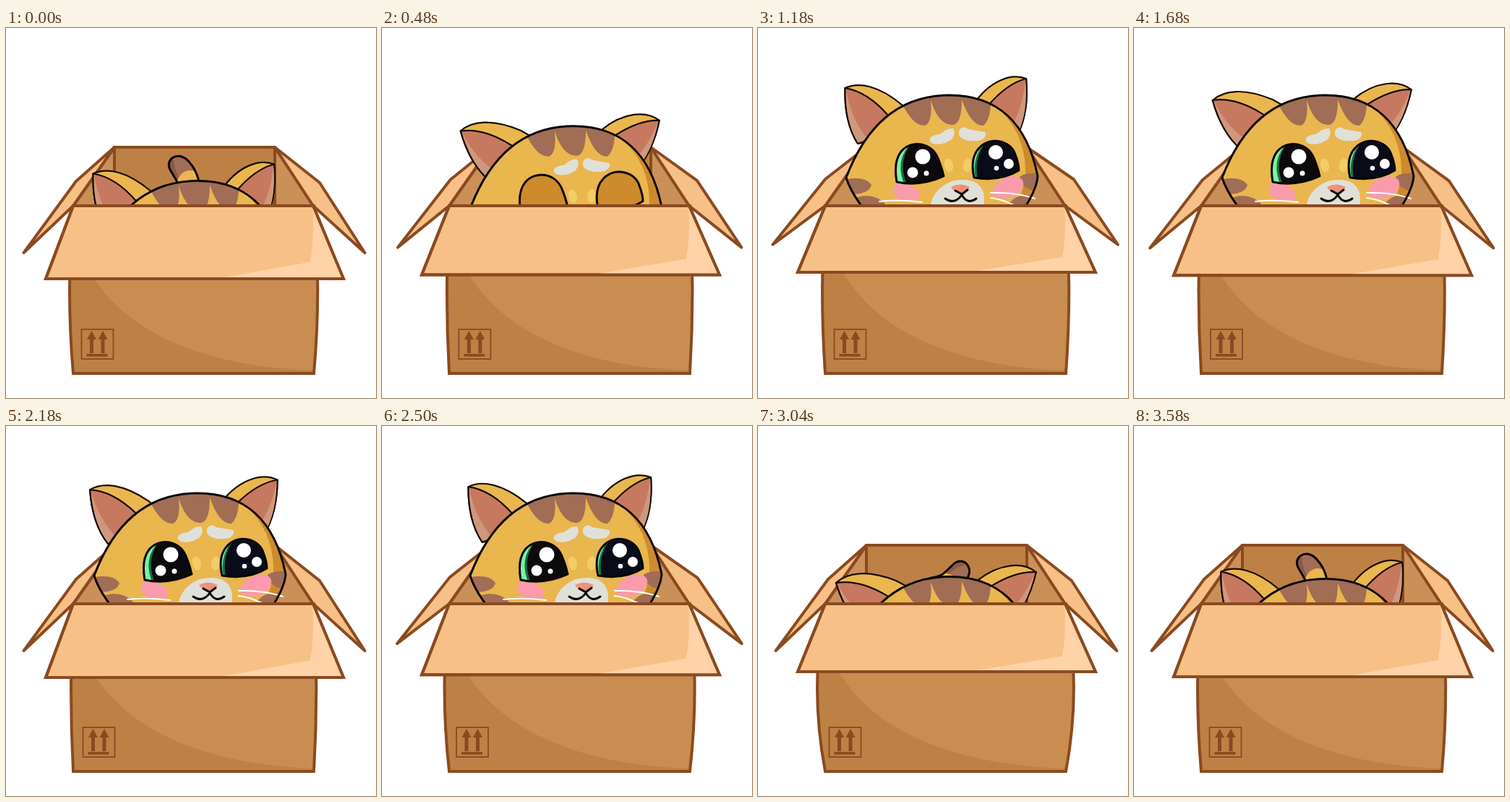
An HTML page for the animation above (3.6 s loop, 512 by 512 pixels).

```html
<!DOCTYPE html>
<html lang="en">
<head>
<meta charset="utf-8">
<title>Cat in a box</title>
<style>
  html, body { margin: 0; width: 100%; height: 100%; overflow: hidden; background: #fff; }
  svg { display: block; width: 100vw; height: 100vh; }
  .edge { stroke: #8a4a20; stroke-width: 4; }
  .round { stroke-linejoin: round; }
  .ink { stroke: #0b0706; stroke-width: 3; stroke-linejoin: round; }
  .thin { stroke: #1a0d08; stroke-width: 2.2; stroke-linejoin: round; }
  .none { fill: none; }
  .card { fill: #f6c086; }
  .fur { fill: #eab64e; }
  .brown { fill: #a16d55; }
  .shade { fill: #ce8b2c; }
  .pale { fill: #dfe1d9; }
  .pink { fill: #f99bab; }
  .rose { fill: #c7795f; }
  .rim { fill: #cf987e; }
  .shine { fill: #fff; }
</style>
</head>
<body>
<svg viewBox="0 0 512 512">
  <defs>
    <path id="headShape" d="M122 207C149 136 194 93 265 93C330 93 372 130 387 205C386 220 378 234 372 244L360 262H155Q128 228 122 207Z"/>
    <path id="eyeL" d="M192 213Q187 185 198 171C212 154 240 158 249 180Q254 192 257 205Q225 220 192 213Z"/>
    <path id="eyeR" d="M299 207Q293 180 306 166C322 149 350 156 356 175Q361 188 361 197Q335 213 299 207Z"/>
    <path id="tailShape" d="M239 233Q240 218 237 213L227 196C220 182 236 171 249 181Q262 192 267 212L272 240Z"/>
    <clipPath id="opening"><rect width="512" height="246"/></clipPath>
    <clipPath id="headClip"><use href="#headShape"/></clipPath>
    <clipPath id="eyeClipL"><use href="#eyeL"/></clipPath>
    <clipPath id="eyeClipR"><use href="#eyeR"/></clipPath>
    <clipPath id="tailClip"><use href="#tailShape"/></clipPath>
  </defs>

  <g class="edge round">
    <path fill="#bd8146" d="M150 165H372V250H150Z"/>
    <path fill="#cb9057" d="M150 165V250H93V246ZM372 165V250H425V246Z"/>
    <path id="flapL" class="card"/>
    <path id="flapR" class="card"/>
  </g>

  <g clip-path="url(#opening)">
    <g id="tail">
      <use href="#tailShape" class="brown"/>
      <g clip-path="url(#tailClip)">
        <path fill="#865a48" d="M222 180L232 182Q232 196 243 214L236 216Z"/>
        <path class="fur" d="M235 216Q243 191 264 199L280 250H230Z"/>
      </g>
      <use href="#tailShape" class="ink none"/>
    </g>

    <g id="cat">
      <g id="earL" class="thin">
        <path class="fur" d="M120.500 83C140 74 168 80 200 107L216 124L178 155L138 160Q119 130 120.500 83Z"/>
        <path class="rose" d="M120.500 83Q152 88 181 122L196 142L138 160Q119 130 120.500 83Z"/>
        <path class="rim" stroke="none" d="M122 85Q128 125 152 154L138 158Q121 130 122 85Z"/>
      </g>
      <g id="earR" class="thin">
        <path class="fur" d="M371 70C350 62 320 73 298 106L288 122L325 155L360 146Q375 115 371 70Z"/>
        <path class="rose" d="M371 70Q344 77 318 108L310 130L332 150L360 146Q375 115 371 70Z"/>
        <path class="rim" stroke="none" d="M370 72Q367 110 350 138L360 145Q374 115 370 72Z"/>
      </g>

      <use href="#headShape" class="fur"/>
      <g clip-path="url(#headClip)">
        <path class="shade" d="M314 98Q371 134 370 202Q367 232 350 262H400V90Z"/>
        <path class="brown" d="M200 106Q215 136 231 135Q242 130 239 100Q250 135 270 134Q282 132 282 99Q295 136 312 135Q321 127 322 106L300 85H220Z"/>
        <path class="brown" d="M118 210Q148 204 157 217Q154 231 124 230ZM132 236Q158 226 176 243L170 262H140ZM390 202Q372 199 362 206Q362 220 384 226ZM380 231Q358 229 347 243L360 262Z"/>
      </g>
      <path class="pink" d="M187 222Q187 213 203 216Q222 219 224 232Q224 240 212 240Q187 239 187 222ZM323 228Q330 208 352 205Q369 206 367 218Q362 234 343 236Q327 237 323 228Z"/>
      <path class="pale" d="M239 262Q234 226 268 212Q304 204 312 228Q315 243 308 262Z"/>
      <path class="pale" d="M238 153Q240 148 252 147Q262 138 270 139Q274 146 268 154Q256 163 242 160Q237 158 238 153ZM278 143Q282 134 291 140Q302 142 314 144Q318 149 309 155Q290 159 280 151Q277 147 278 143Z"/>
      <g fill="#f3cc66">
        <ellipse cx="264" cy="190" rx="6" ry="9.5" transform="rotate(-12 264 190)"/>
        <ellipse cx="290" cy="190" rx="6" ry="9.5" transform="rotate(8 290 190)"/>
      </g>

      <g clip-path="url(#eyeClipL)">
        <use href="#eyeL" fill="#0c0a0d"/>
        <path fill="#1d6b46" d="M212 160Q193 184 206 217L188 218V160Z"/>
        <path fill="#7cf3a0" d="M207 165Q190 187 203 218L188 218V165Z"/>
        <g class="shine"><circle cx="228" cy="178" r="10.5"/><circle cx="214" cy="200" r="7.5"/><circle cx="233" cy="201" r="3.5"/></g>
        <rect class="shade lid" x="185" y="154" width="76" height="64"/>
      </g>
      <use href="#eyeL" class="ink none"/>
      <g clip-path="url(#eyeClipR)">
        <use href="#eyeR" fill="#090c18"/>
        <path fill="#1d6b46" d="M317 156Q297 180 305 212H294V155Z"/>
        <path fill="#7cf3a0" d="M313 159Q294 182 302 212H294V160Z"/>
        <g class="shine"><circle cx="329" cy="172" r="10"/><circle cx="347" cy="188" r="7"/><circle cx="330" cy="194" r="3.3"/></g>
        <rect class="shade lid" x="290" y="150" width="76" height="64"/>
      </g>
      <use href="#eyeR" class="ink none"/>

      <path fill="#f0917c" d="M267 220Q280 213 293 220Q288 229 281 230Q272 228 267 220Z"/>
      <path class="ink none" stroke-linecap="round" d="M273 225L282 230L290 224M259 236Q272 245 282 231Q290 245 302 236"/>
      <path class="none" stroke="#fff" stroke-width="2" stroke-linecap="round" d="M168 240Q195 237 227 241M322 228Q358 227 383 236M322 235Q338 237 354 245"/>
      <use href="#headShape" class="ink none"/>
    </g>
  </g>

  <path id="body" fill="#ca8d51"/>
  <path id="bodyShade" fill="#bd8146"/>
  <path id="bodyEdge" class="edge none"/>
  <g id="stamp" fill="#8a4a20">
    <rect x="1" y="417" width="44" height="41" fill="none" stroke="#8a4a20" stroke-width="1.8"/>
    <path id="arrow" d="M15 419L21.500 431H17.500V450H12.500V431H8.500Z"/>
    <use href="#arrow" x="15.500"/>
    <rect x="8" y="451" width="29" height="3.600"/>
  </g>
  <path id="front" class="edge card"/>
  <path id="frontLight" fill="#ffd2a7"/>
  <path id="frontEdge" class="edge none"/>
</svg>
<script>
const LOOP = 3600, SWAY = 1200;
const $ = id => document.getElementById(id);
const lids = document.querySelectorAll('.lid');
const wave = u => (1 - Math.cos(Math.PI * u)) / 2;
const draw = (id, d) => $(id).setAttribute('d', d);
const move = (id, value) => $(id).setAttribute('transform', value);

// Keys are [time, value] pairs, eased in and out.
function track(t, keys) {
  const i = keys.findIndex(k => k[0] > t);
  if (i < 0) return keys[keys.length - 1][1];
  const [t0, a] = keys[i - 1], [t1, b] = keys[i];
  return a + (b - a) * wave((t - t0) / (t1 - t0));
}

const headDrop = [[0, 118.5], [815, 0], [2520, 0], [3100, 118.5]];
const flapLift = [[0, 0], [800, .75], [1300, .75], [2150, 0], [2200, 0], [2700, 1], [3040, 0]];
const frontDrop = [[0, 347], [800, 338.5], [1300, 338], [2150, 348], [2200, 348], [2850, 339.5], [3040, 340], [3600, 347]];
const bodyBulge = [[0, 5], [600, 3], [1200, 4], [2200, 3], [2850, 11], [3100, 11], [3600, 5]];
const lidClose = [[0, 1], [560, 1], [760, 0]];

function render(t) {
  const sway = wave(2 * t / SWAY);
  move('cat', `translate(0 ${track(t, headDrop)})`);
  move('earL', `rotate(${-19.2 * sway} 170 130)`);
  move('earR', `rotate(${18.5 * sway} 326 121)`);
  move('tail', `rotate(${78 * sway} 252.6 221)`);

  const lid = track(t, lidClose);
  lids.forEach(el => el.setAttribute('height', 64 * lid));

  const p = track(t, flapLift);
  draw('flapL', `M150 165L${97 - 5 * p} ${212 - 4 * p}L${24.5 - 5.5 * p} ${311 - 15 * p}L93 246Z`);
  draw('flapR', `M372 165L${434 + 4 * p} ${214 - 6 * p}L${496.5 + 2 * p} ${311 - 15 * p}L425 246Z`);

  const b = track(t, bodyBulge);
  const left = `Q${93 - 2 * b} 362 93 478`;
  const box = `M93 246${left}H426Q${427 + 1.9 * b} 362 426 246Z`;
  draw('body', box);
  draw('bodyEdge', box);
  draw('bodyShade', `M93 246${left}H426L425 474C${283 - b} 468 ${168 - b} 425 ${117 - b} 330Z`);
  move('stamp', `translate(${108.5 - b} 0)`);

  const y = track(t, frontDrop), at = k => 246 + (y - 246) * k;
  const front = `M93 246H425L467 ${y}H55Z`;
  draw('front', front);
  draw('frontLight', `M424 246Q427 ${at(.4)} 421 ${at(.77)}L290 ${y}H467L425 246Z`);
  draw('frontEdge', front);
}

const start = performance.now();
(function tick() {
  render((performance.now() - start) % LOOP);
  requestAnimationFrame(tick);
})();
</script>
</body>
</html>
```
